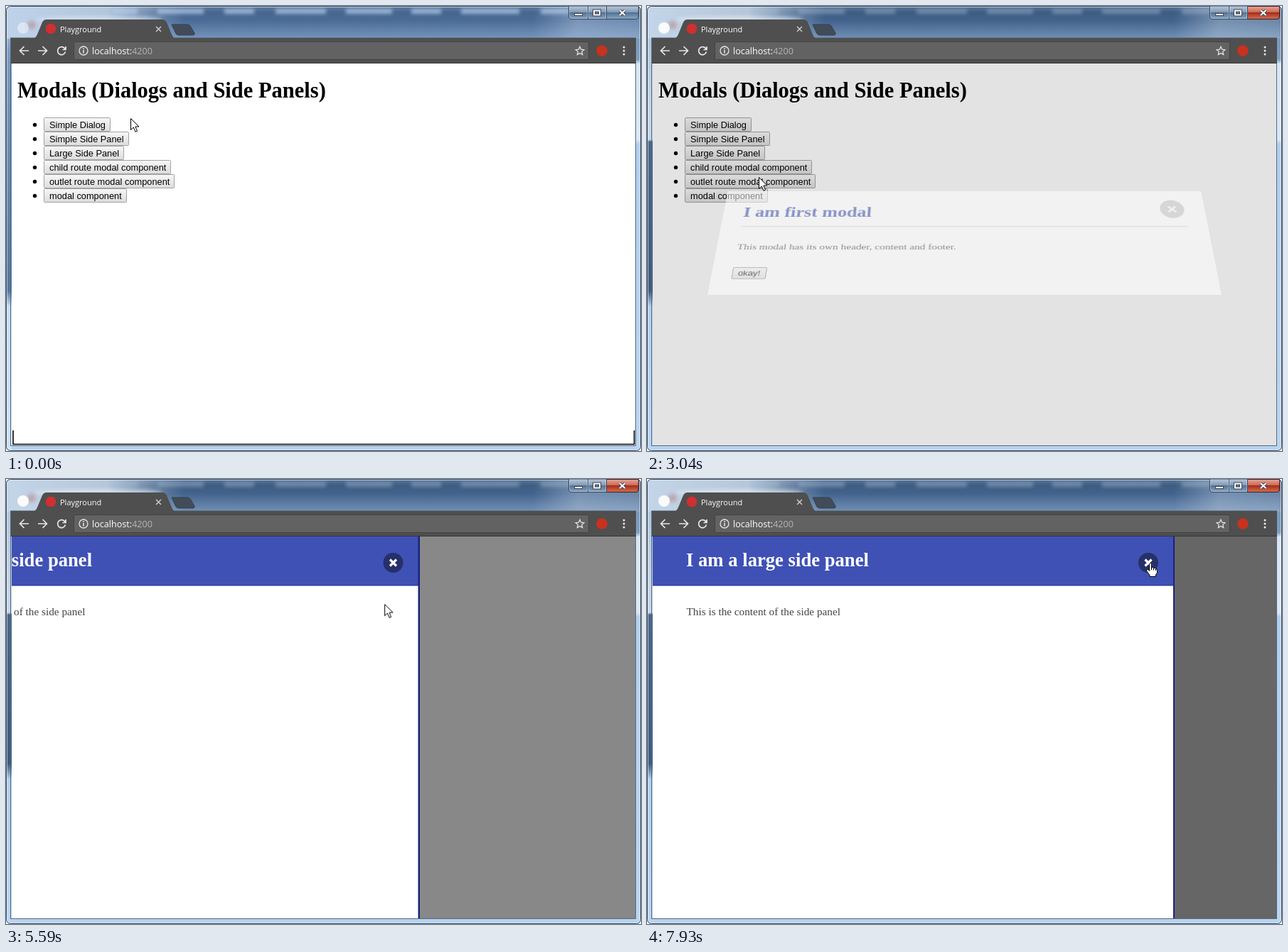
Recreate the animation shown at these times as an HTML page. Size 893 by 627 pixels, loop 8000 ms.

```html
<!DOCTYPE html>
<html lang="en">
<head>
<meta charset="utf-8">
<title>Modal playground</title>
<style>
html, body { margin: 0; width: 100%; height: 100%; overflow: hidden; background: #fff; }
svg { display: block; position: absolute; left: 0; top: 0; overflow: visible; }
.serif { font-family: "Liberation Serif", "Times New Roman", serif; }
.sans { font-family: "Liberation Sans", Arial, sans-serif; font-size: 12.8px; }
.ui { font-family: "Open Sans", "Noto Sans", sans-serif; }
.title { font-size: 26.67px; font-weight: bold; }
.body { font-size: 15.25px; fill: #444; }

/* page area below the toolbar */
#view { position: absolute; left: 8px; top: 81px; width: 877px; height: 538px; overflow: hidden; }
#shade { position: absolute; inset: 0; background: rgba(0,0,0,.6); }
#dialog { position: absolute; left: 92px; top: 153px; width: 693px; height: 194px; background: #fff; }
#panel { position: absolute; left: 0; top: 0; width: 732px; height: 538px; background: #fff; border-right: 2px solid #1a237e; }
#panel header { height: 68px; background: #3f51b5; border-bottom: 1px solid #303f9f; box-shadow: 0 1px #8790c4; }

#shade, #dialog, #panel, #pointer { animation: 8s linear infinite; }
#shade { animation-name: shade; }
#dialog { animation-name: dialog; }
#panel { animation-name: panel; }
#pointer { animation-name: pointer; }
.idle, .active, .first, .large, .arrow, .beam, .hand { animation: 8s step-end infinite; }
.idle { animation-name: idle; }
.active { animation-name: active; }
.first { animation-name: first; }
.large { animation-name: large; }
.arrow { animation-name: arrow; }
.beam { animation-name: beam; }
.hand { animation-name: hand; }

@keyframes shade {
  0%, 14.75%, 39%, 48%, 74.06%, 81.875% { opacity: 0; }
  20.125%, 33.625%, 53.375%, 68.69%, 87.25%, 100% { opacity: 1; }
}
@keyframes dialog {
  0%, 14.75%, 43.25%, 100% { opacity: 0; transform: perspective(1530px) rotateX(90deg); }
  24.125%, 33.625% { opacity: 1; transform: perspective(1530px) rotateX(0deg); }
}
@keyframes panel {
  0% { transform: translateX(-740px); }
  48.02% { transform: translateX(-740px); animation-timing-function: ease; }
  56.145% { transform: none; }
  68.85% { transform: none; animation-timing-function: ease; }
  75.1% { transform: translateX(-732px); }
  75.3% { transform: translateX(-740px); }
  81.875% { transform: translateX(-740px); animation-timing-function: ease; }
  90%, 100% { transform: none; }
}
@keyframes pointer {
  0%, 3.75% { transform: translate(175px,158px); }
  9% { transform: translate(122px,164px); }
  13.25%, 15% { transform: translate(110px,168px); }
  20% { transform: translate(112px,188px); }
  24.4% { transform: translate(128px,305px); }
  28.5% { transform: translate(145px,395px); }
  30.5%, 33.625% { transform: translate(147px,391px); }
  38% { transform: translate(157px,241px); }
  43.25%, 45.25% { transform: translate(152px,189px); }
  48%, 56.2% { transform: translate(152px,190px); }
  61.25% { transform: translate(520px,150px); }
  65.6% { transform: translate(698px,122px); }
  68.2% { transform: translate(705px,119px); }
  69.875% { transform: translate(533px,176px); }
  75% { transform: translate(190px,228px); }
  78.1% { transform: translate(132px,209px); }
  81.9%, 87% { transform: translate(126px,208px); }
  91.3% { transform: translate(480px,160px); }
  96%, 98% { transform: translate(717px,118px); }
  99.1%, 100% { transform: translate(708px,118px); }
}
@keyframes idle { 0% { opacity: 1; } 3.75%, 100% { opacity: 0; } }
@keyframes active { 0% { opacity: 0; } 3.75%, 100% { opacity: 1; } }
@keyframes first { 0% { opacity: 1; } 78%, 100% { opacity: 0; } }
@keyframes large { 0% { opacity: 0; } 78%, 100% { opacity: 1; } }
@keyframes arrow { 0%, 57%, 68.5% { opacity: 1; } 49.375%, 65.375%, 95.3%, 100% { opacity: 0; } }
@keyframes beam { 0%, 57%, 100% { opacity: 0; } 49.375% { opacity: 1; } }
@keyframes hand { 0%, 68.5% { opacity: 0; } 65.375%, 95.3%, 100% { opacity: 1; } }
</style>
</head>
<body>
<svg id="base" width="893" height="627" viewBox="0 0 893 627">
  <defs>
    <linearGradient id="bar" x2="0" y2="1">
      <stop offset="0" stop-color="#5d7a9d"/><stop offset=".2" stop-color="#3f5c82"/>
      <stop offset=".45" stop-color="#42638d"/><stop offset="1" stop-color="#7391b5"/>
    </linearGradient>
    <linearGradient id="glow">
      <stop offset="0" stop-color="#c3d5e8"/><stop offset=".16" stop-color="#c9d8e7" stop-opacity=".85"/>
      <stop offset=".28" stop-color="#b5c8dc" stop-opacity="0"/><stop offset=".83" stop-color="#b5c8dc" stop-opacity="0"/>
      <stop offset=".9" stop-color="#b5c8dc" stop-opacity=".45"/><stop offset="1" stop-color="#b5c8dc" stop-opacity=".35"/>
    </linearGradient>
    <linearGradient id="side" x2="0" y2="1">
      <stop offset="0" stop-color="#a9c0d8"/><stop offset=".24" stop-color="#c8d7e6"/>
      <stop offset=".3" stop-color="#c8d7e6"/><stop offset=".305" stop-color="#4a678c"/>
      <stop offset=".64" stop-color="#3f5a7e"/><stop offset=".675" stop-color="#b4d0ec"/>
      <stop offset="1" stop-color="#bcd6f0"/>
    </linearGradient>
    <linearGradient id="sideIdle" x2="0" y2="1">
      <stop offset="0" stop-color="#dce8f4"/><stop offset=".1" stop-color="#7d9cc2"/>
      <stop offset=".64" stop-color="#55779f"/><stop offset=".675" stop-color="#c9def2"/>
      <stop offset="1" stop-color="#cfe2f5"/>
    </linearGradient>
    <linearGradient id="right" x2="0" y2="1">
      <stop offset="0" stop-color="#6f90b5"/><stop offset=".12" stop-color="#7f9fc2"/>
      <stop offset=".13" stop-color="#d9e6f3"/><stop offset=".3" stop-color="#dbe8f5"/>
      <stop offset=".31" stop-color="#b3cfec"/><stop offset="1" stop-color="#bcd6f0"/>
    </linearGradient>
    <linearGradient id="btn" x2="0" y2="1"><stop offset="0" stop-color="#f7f7f7"/><stop offset="1" stop-color="#dcdcdc"/></linearGradient>
    <linearGradient id="glass" x2="0" y2="1">
      <stop offset="0" stop-color="#b9c9da"/><stop offset=".48" stop-color="#8199b5"/>
      <stop offset=".5" stop-color="#527093"/><stop offset="1" stop-color="#8ba7c5"/>
    </linearGradient>
    <linearGradient id="red" x2="0" y2="1">
      <stop offset="0" stop-color="#e3a79b"/><stop offset=".48" stop-color="#cb6552"/>
      <stop offset=".5" stop-color="#a92c18"/><stop offset="1" stop-color="#cf7258"/>
    </linearGradient>
    <filter id="blur" x="-30%" y="-150%" width="160%" height="400%"><feGaussianBlur stdDeviation="2.6"/></filter>
    <clipPath id="win"><rect width="893" height="627" rx="6"/></clipPath>
    <g id="labels" filter="url(#blur)"></g>
  </defs>

  <g clip-path="url(#win)">
    <rect width="893" height="627" fill="#b8d3ee"/>
    <rect width="8" height="627" fill="url(#side)"/>
    <rect class="idle" width="8" height="627" fill="url(#sideIdle)"/>
    <rect x="885" width="8" height="627" fill="url(#right)"/>
    <rect width="893" height="46" fill="url(#bar)"/>
    <rect width="893" height="46" fill="url(#glow)"/>
    <ellipse cx="130" cy="19" rx="90" ry="5" fill="#e6eef6" fill-opacity=".6" filter="url(#blur)"/>
    <rect class="idle" width="893" height="46" fill="#8fbcf0" fill-opacity=".1"/>
    <use class="idle" href="#labels" fill="#b4cdea" fill-opacity=".75"/>
    <use class="active" href="#labels" fill="#a9bfd8" fill-opacity=".45"/>
    <circle cx="36" cy="27" r="6" fill="#b98c8c" fill-opacity=".6" filter="url(#blur)"/>
  </g>
  <rect x=".5" y=".5" width="892" height="626" rx="6" fill="none" stroke="#34465c"/>
  <rect x="1.5" y="1.5" width="890" height="624" rx="5" fill="none" stroke="#e8f2fb" stroke-opacity=".65"/>
  <rect x="6.5" y="45" width="879" height="574.5" fill="none" stroke="#526a84"/>

  <!-- window buttons -->
  <g>
    <path d="M791.5 0V14q0 4.5 4.5 4.5H885q4.5 0 4.5-4.5V0Z" fill="url(#glass)" stroke="#34465c"/>
    <path class="active" d="M844.5 .5V18.5H885q4.5 0 4.5-4.5V.5Z" fill="url(#red)" stroke="#4b1d18"/>
    <path d="M818.5 0V18M844.5 0V18" stroke="#34465c"/>
    <path d="M792.5 1V14q0 3.5 3.5 3.5H817.5V1M819.5 1V17.5H843.5V1" fill="none" stroke="#fff" stroke-opacity=".4"/>
    <rect x="799.5" y="10.5" width="11" height="3" fill="#fff" stroke="#3c4652"/>
    <path d="M827 6.5H835V12.5H827Z" fill="none" stroke="#3c4652" stroke-width="4"/>
    <path d="M827 6.5H835V12.5H827Z" fill="none" stroke="#fff" stroke-width="2"/>
    <path d="M863 6l7.500 7M870.5 6l-7.500 7" stroke="#3c4652" stroke-width="4.200"/>
    <path d="M863 6l7.500 7M870.5 6l-7.500 7" stroke="#fff" stroke-width="2.200"/>
  </g>

  <!-- tab strip and toolbar -->
  <circle class="idle" cx="24" cy="31" r="8" fill="#fff" fill-opacity=".45"/>
  <circle class="active" cx="24" cy="31" r="8" fill="#fff" fill-opacity=".9"/>
  <path d="M233 26H255q3 0 4 2l6 10q1 3-2 3H243q-3 0-4-2Z" fill="#424c59" stroke="#33404f"/>
  <path d="M38 46q4-1 6-6l7-17q2-4 6-4H220q4 0 6 4l7 17q2 5 6 6Z" fill="#4f4f4f"/>
  <rect x="7" y="45" width="879" height="36" fill="#4f4f4f"/>
  <rect x="7" y="80" width="879" height="1" fill="#363636"/>
  <circle cx="63" cy="32" r="7.300" fill="#d0302f"/>
  <text class="ui" x="76" y="36.5" font-size="11" fill="#fff">Playground</text>
  <path d="M211 29l7 7M218 29l-7 7" stroke="#d0d0d0" stroke-width="1.4"/>
  <rect x="95.5" y="50.5" width="724" height="25" rx="2" fill="#626262" stroke="#424242"/>
  <g fill="none" stroke="#e8e8e8" stroke-width="1.7">
    <path d="M32 63H19.5M25.5 57l-6 6 6 6M45 63H57.5M51.5 57l6 6-6 6"/>
    <path d="M83 60.5A5.5 5.5 0 1 0 83.5 64.5M84 57V61.5H79.5"/>
    <circle cx="109" cy="63" r="6" stroke-width="1.3"/>
    <path d="M109 62V66.5M109 59.3V60.9" stroke-width="1.5"/>
    <path d="M807 57.300l1.700 3.900 4.200.4-3.200 2.800 1 4.200-3.700-2.200-3.700 2.200 1-4.200-3.200-2.800 4.200-.4Z" stroke-width="1.2"/>
  </g>
  <text class="ui" x="121" y="67.5" font-size="12.6" fill="#fff">localhost:<tspan fill="#b4b4b4">4200</tspan></text>
  <circle cx="838" cy="63" r="7.8" fill="#c8321f"/>
  <g fill="#e8e8e8"><circle cx="869" cy="58" r="1.5"/><circle cx="869" cy="63" r="1.5"/><circle cx="869" cy="68" r="1.5"/></g>

  <!-- page -->
  <rect x="8" y="81" width="877" height="538" fill="#fff"/>
  <text class="serif" x="16" y="129" font-size="30.5" font-weight="bold">Modals (Dialogs and Side Panels)</text>
  <g id="list" class="sans"></g>
  <path class="idle" d="M10 598V617.5H883.5V598" fill="none" stroke="#000" stroke-width="1.6"/>
</svg>

<div id="view">
  <div id="shade"></div>
  <div id="dialog">
    <svg width="693" height="194">
      <text class="serif title" x="28.5" y="51" fill="#3f51b5">I am first modal</text>
      <circle cx="646" cy="36" r="17.5" fill="#ccc"/>
      <path d="M640.5 30.5l11 11M651.5 30.5l-11 11" stroke="#fff" stroke-width="3"/>
      <rect x="28.5" y="69" width="635.5" height="1.5" fill="#ddd"/>
      <text class="serif body" x="28.5" y="113">This modal has its own header, content and footer.</text>
      <rect x="28.5" y="145.5" width="46" height="20" rx="1.5" fill="url(#btn)" stroke="#858585"/>
      <text class="sans" x="36" y="160">okay!</text>
    </svg>
  </div>
  <div id="panel">
    <header></header>
    <svg width="732" height="538">
      <g class="serif title" fill="#fff">
        <text class="first" x="47" y="42">I am first side panel</text>
        <text class="large" x="47" y="42">I am a large side panel</text>
      </g>
      <circle cx="697" cy="37" r="14" fill="#263069"/>
      <path d="M692.5 32.5l9 9M701.5 32.5l-9 9" stroke="#fff" stroke-width="3.2"/>
      <text class="serif body" x="47.5" y="111">This is the content of the side panel</text>
    </svg>
  </div>
</div>

<svg id="pointer" width="20" height="24">
  <path class="arrow" d="M.5 .5V16.5L4.3 13 7 19.3 9.5 18.2 6.9 12H12Z" fill="#fff" stroke="#000"/>
  <path class="beam" d="M-3-7.5H-1Q0-7.5 0-6.5 0-7.5 1-7.5H3M0-6.5V6.5M-3 7.5H-1Q0 7.5 0 6.5 0 7.5 1 7.5H3" fill="none" stroke="#000" stroke-width="1.2"/>
  <path class="hand" d="M-1.5 1.5Q0-1 1.5 1.5V7Q3.5 5.5 4.5 7.5 6.5 6.5 7.5 8.5 9.5 8 9.5 10.5V14L7.5 17V19.5H-1V17.5L-5.5 11.5Q-6 9-3.5 9.5L-1.5 11.5ZM1.5 7V10M4.5 7.5V10.5M7.5 8.5V11" fill="#fff" stroke="#000"/>
</svg>

<script>
const NS = "http://www.w3.org/2000/svg";
const add = (parent, tag, attrs, text = "") => {
  const el = document.createElementNS(NS, tag);
  for (const key in attrs) el.setAttribute(key, attrs[key]);
  el.textContent = text;
  parent.append(el);
};

const list = document.getElementById("list");
const items = [["Simple Dialog", 93], ["Simple Side Panel", 119], ["Large Side Panel", 112],
  ["child route modal component", 178], ["outlet route modal component", 183], ["modal component", 116]];
items.forEach(([label, width], i) => {
  const y = 157.5 + 20 * i;
  add(list, "circle", { cx: 40.5, cy: y + 10, r: 2.7 });
  add(list, "rect", { x: 53.5, y, width, height: 19, rx: 1, fill: "url(#btn)", stroke: "#a3a3a3" });
  add(list, "text", { x: 61, y: y + 14.5 }, label);
});

const labels = document.getElementById("labels");
[[150, 35], [213, 65], [307, 42], [379, 71], [478, 65], [570, 42], [640, 82], [752, 40]]
  .forEach(([x, width]) => add(labels, "rect", { x, y: 4, width, height: 7 }));
</script>
</body>
</html>
```
